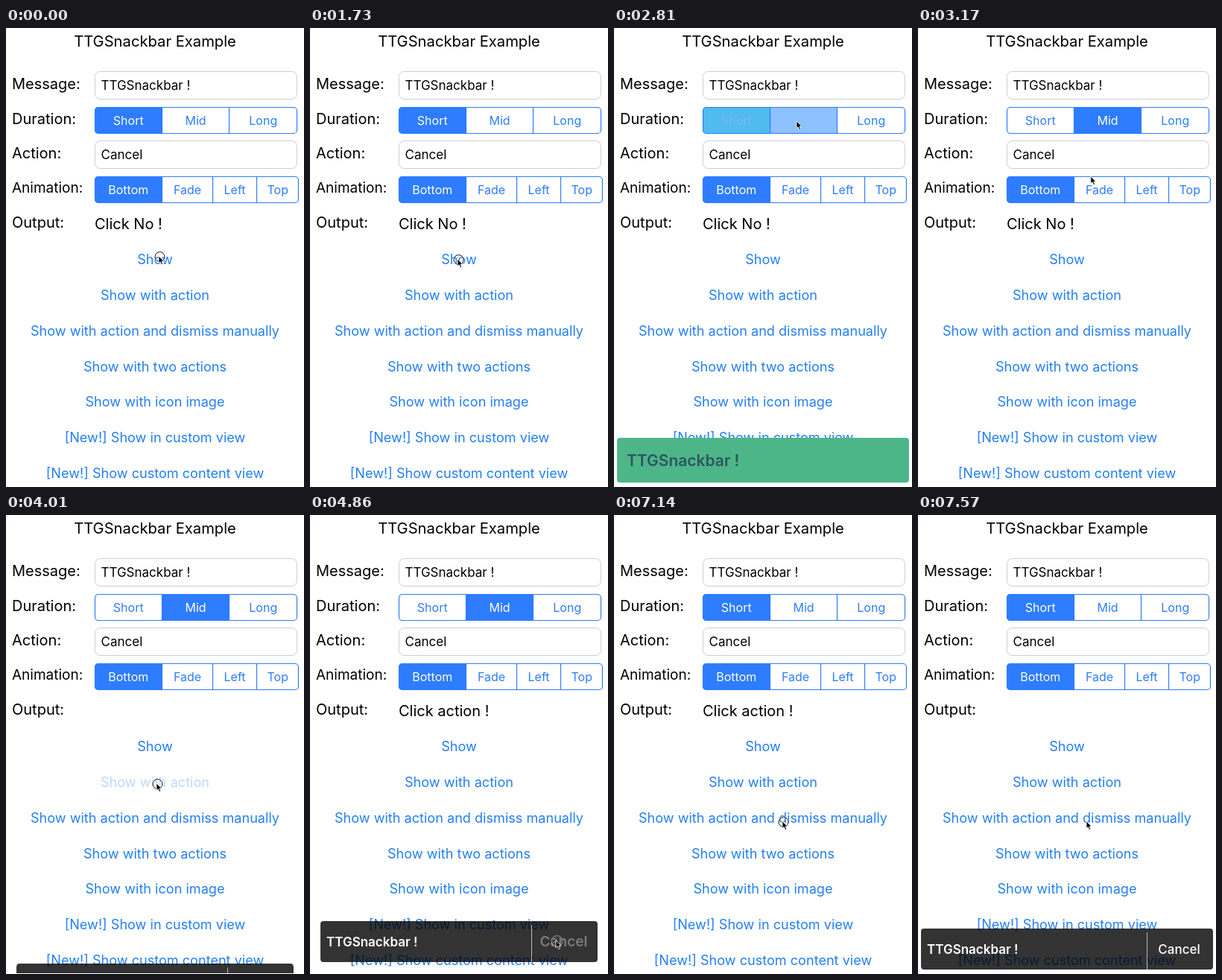
An HTML page for the animation above (8000 ms loop, 400 by 616 pixels).

```html
<!DOCTYPE html>
<html lang="en">
<head>
<meta charset="utf-8">
<title>TTGSnackbar Example</title>
<style>
  html, body { margin: 0; width: 100%; height: 100%; overflow: hidden; background: #fff; }
  svg { display: block; font-family: Inter, Roboto, sans-serif; font-optical-sizing: none; }
  .mid { text-anchor: middle; }
  .field { fill: #fff; stroke: #cdcdcd; }
  .frame { fill: none; stroke: #2e7cff; stroke-width: 1.2; }
</style>
</head>
<body>
<svg id="stage" width="400" height="616" viewBox="0 0 400 616">
  <defs>
    <clipPath id="screen"><rect width="400" height="615"/></clipPath>
    <clipPath id="round0"><rect x="119" y="106" width="272" height="36" rx="5"/></clipPath>
    <clipPath id="round1"><rect x="119" y="199" width="274" height="36" rx="5"/></clipPath>
  </defs>
  <g id="form"></g>
  <g id="bars" clip-path="url(#screen)"></g>
  <g id="cursor">
    <g id="ring" fill="none">
      <circle cx="1.5" cy="1" r="6.8" stroke="#fff" stroke-width="2" opacity=".6"/>
      <circle cx="1.5" cy="1" r="6.5" stroke="#111"/>
    </g>
    <path d="M0 0V9.6L2.2 7.7L3.8 11.6L5.6 10.8L4 7.1H7Z" fill="#000" stroke="#fff" stroke-width=".8"/>
  </g>
</svg>
<script>
const LOOP = 8000, LEAD = 15, BLUE = '#2e7cff', LINK = '#247ff2', HOLD = 'step-end';
const byId = id => document.getElementById(id);
const form = byId('form'), bars = byId('bars');

function add(parent, tag, attrs, text = '') {
  const el = document.createElementNS('http://www.w3.org/2000/svg', tag);
  for (const key in attrs) el.setAttribute(key, attrs[key]);
  el.textContent = text;
  return parent.appendChild(el);
}
const label = (text, x, y, size, attrs = {}, parent = form) =>
  add(parent, 'text', { x, y, 'font-size': size, ...attrs }, text);

// A small lead lets hard changes land on their display frame, not one later.
const startTime = (document.timeline.currentTime || 0) - LEAD;
// Each step is [ms, value, easing towards the next step].
function play(el, prop, steps) {
  const last = steps[steps.length - 1];
  const frames = [...steps, [LOOP, last[1]]].map(([t, value, easing = 'linear']) =>
    ({ offset: t / LOOP, [prop]: value, easing }));
  el.animate(frames, { duration: LOOP, iterations: Infinity }).startTime = startTime;
}

// Form
label('TTGSnackbar Example', 200, 25, 20.2, { class: 'mid' });
[['Message:', 82], ['Duration:', 129], ['Action:', 175], ['Animation:', 221, 19], ['Output:', 268]]
  .forEach(([text, y, size = 20]) => label(text, 8, y - .5, size));
[['TTGSnackbar !', 58.5], ['Cancel', 151.5]].forEach(([text, y]) => {
  add(form, 'rect', { x: 119.5, y, width: 271, height: 37, rx: 7, class: 'field' });
  label(text, 127.5, y + 24.5, 17);
});

function segments(id, y, edges, names) {
  const right = edges[edges.length - 1];
  const fills = add(form, 'g', { 'clip-path': `url(#${id})` });
  const cells = names.map((name, i) => ({
    fill: add(fills, 'rect', {
      x: edges[i], y, width: edges[i + 1] - edges[i], height: 36, fill: i ? '#fff' : BLUE }),
    text: label(name, (edges[i] + edges[i + 1]) / 2, y + 23.8, 16,
      { class: 'mid', fill: i ? BLUE : '#fff' })
  }));
  add(form, 'rect', { x: 119.5, y: y + .5, width: right - 120, height: 35, rx: 4.5, class: 'frame' });
  edges.slice(1, -1).forEach(x => add(form, 'path', { d: `M${x} ${y}v36`, class: 'frame' }));
  return cells;
}
const [short, mid] = segments('round0', 106, [119, 209.5, 299.5, 391], ['Short', 'Mid', 'Long']);
segments('round1', 199, [119, 209.5, 277.5, 336.5, 393], ['Bottom', 'Fade', 'Left', 'Top']);

const selectFill = t => [[t, '#b8dcff', HOLD], [t + 60, '#8ec1ff'], [t + 200, BLUE, HOLD]];
const selectText = t => [[t, BLUE, HOLD], [t + 60, '#8ec1ff'], [t + 200, '#fff', HOLD]];
const clearFill = t => [[t, '#3180ff', HOLD], [t + 60, '#4fbbef'], [t + 200, '#fff', HOLD]];
const clearText = t => [[t, '#fff', HOLD], [t + 60, '#7fb6f3'], [t + 200, BLUE, HOLD]];
const TO_MID = 2750, TO_SHORT = 5790;
play(short.fill, 'fill', [[0, BLUE, HOLD], ...clearFill(TO_MID), ...selectFill(TO_SHORT)]);
play(short.text, 'fill', [[0, '#fff', HOLD], ...clearText(TO_MID), ...selectText(TO_SHORT)]);
play(mid.fill, 'fill', [[0, '#fff', HOLD], ...selectFill(TO_MID), ...clearFill(TO_SHORT)]);
play(mid.text, 'fill', [[0, BLUE, HOLD], ...selectText(TO_MID), ...clearText(TO_SHORT)]);

const clickNo = label('Click No !', 119, 270, 20);
const clickAction = label('Click action !', 119, 270, 20);
play(clickNo, 'opacity', [[0, 1, HOLD], [4010, 0, HOLD]]);
play(clickAction, 'opacity', [[0, 0, HOLD], [4860, 1, HOLD], [7200, 0, HOLD]]);

const links = ['Show', 'Show with action', 'Show with action and dismiss manually',
  'Show with two actions', 'Show with icon image', '[New!] Show in custom view',
  '[New!] Show custom content view'
].map((text, i) => label(text, 200, 317.3 + 47.75 * i, 18.1, { class: 'mid', fill: LINK }));
[1790, 4010, 7200].forEach((t, i) => play(links[i], 'opacity',
  [[0, 1, HOLD], [t, .3, HOLD], [t + 120, .3, 'ease-out'], [t + 350, 1]]));

// Snackbars
function snackbar({ margin, top, height, fill, text, size, ink, action, actionStyle }) {
  const bar = add(bars, 'g', {});
  add(bar, 'rect', { x: margin, y: top, width: 400 - 2 * margin, height, rx: 4, fill });
  const pad = action ? 8 : 13, base = top + height / 2 + size * .36;
  label(text, margin + pad, base, size, { fill: ink, 'font-weight': 600 }, bar);
  if (!action) return { bar };
  const x = 311.5 - margin;
  add(bar, 'path', { d: `M${x} ${top + 5}V${top + height}`, stroke: '#bbb' });
  return { bar, button: label(action, x + 43, base, size, { class: 'mid', fill: ink, ...actionStyle }, bar) };
}
const shift = y => `translateY(${y}px)`;
const RISE = 'cubic-bezier(.2, .85, .35, 1.08)', FALL = 'cubic-bezier(.42, 0, .7, 1)';
const slide = (bar, depth, rise, fall) => play(bar, 'transform', [
  [0, shift(depth), HOLD], [rise, shift(depth - 13), RISE], [rise + 360, shift(0), HOLD],
  ...(fall ? [[fall, shift(0), FALL], [fall + 300, shift(depth)]] : [])
]);
const dark = { height: 55, fill: 'rgba(0,0,0,.8)', text: 'TTGSnackbar !', size: 17, ink: '#fff', action: 'Cancel' };

const green = snackbar({ margin: 4, top: 550, height: 60, fill: '#4db688',
  text: 'TTGSnackbar !', size: 21, ink: '#2f5560' });
slide(green.bar, 66, 1790, 2860);

const inset = snackbar({ ...dark, margin: 14, top: 545,
  actionStyle: { 'font-size': 19, 'font-weight': 600 } });
slide(inset.bar, 71, 4010, 4920);
play(inset.button, 'opacity', [[0, 1, HOLD], [4860, .35, HOLD]]);

const wide = snackbar({ ...dark, margin: 4, top: 555, actionStyle: { 'font-weight': 500 } });
slide(wide.bar, 61, 7200);

// Pointer
play(byId('cursor'), 'transform', [
  [0, 205, 306], [120, 205, 306], [330, 222, 308], [590, 198, 310], [1790, 198, 310],
  [2520, 245, 124], [2580, 245, 125], [2930, 245, 125], [3550, 203, 361], [3660, 202, 360],
  [4130, 202, 360], [4630, 330, 571], [4920, 330, 571], [5550, 161, 126],
  [5850, 161, 126], [6490, 226, 411]
].map(([t, x, y]) => [t, `translate(${x}px, ${y}px)`, 'ease-in-out']));
play(byId('ring'), 'opacity', [[0, 1, HOLD], [140, 0, HOLD],
  ...[1730, 2750, 4010, 4860, 5790, 7140].flatMap(t => [[t, 1, HOLD], [t + 60, 0, HOLD]])]);
</script>
</body>
</html>
```
